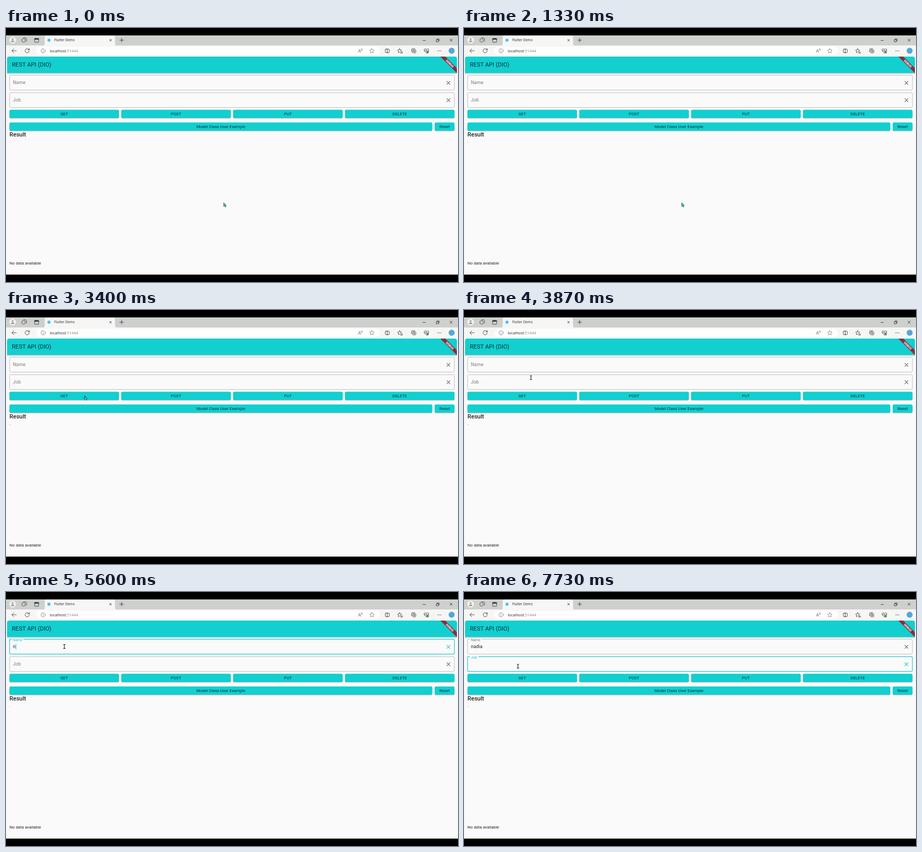
Write an HTML page that moves like this. It is 852 px wide and 480 px high and loops after 8 s.

```html
<!DOCTYPE html>
<html lang="en">
<head>
<meta charset="utf-8">
<title>REST API demo</title>
<style>
  html, body { margin: 0; width: 100%; height: 100%; overflow: hidden; background: #000; }
  svg { display: block; width: 100vw; height: 100vh; }
  text { font-family: Roboto, sans-serif; font-size: 7.77px; fill: #242424; }
  .chrome { font-family: "Open Sans", sans-serif; }
  .mid { text-anchor: middle; fill: #06333a; }
  .icon { fill: none; stroke: #3a3a3a; stroke-width: .85; stroke-linecap: round; stroke-linejoin: round; }
  .thin { fill: none; stroke: #262626; stroke-width: .8; }
</style>
</head>
<body>
<svg id="stage" viewBox="0 0 852 480">
  <defs>
    <clipPath id="bar"><path d="M2 85V58q0-4 4-4H846q4 0 4 4V85Z"/></clipPath>
    <linearGradient id="fade" x2="0" y2="1">
      <stop stop-color="#444" stop-opacity=".36"/>
      <stop offset="1" stop-color="#444" stop-opacity="0"/>
    </linearGradient>
  </defs>
  <rect width="852" height="480"/>

  <!-- browser tabs -->
  <rect y="14" width="852" height="20" fill="#cdd0cd"/>
  <rect y="33" width="852" height="433" fill="#f6f7f5"/>
  <path d="M69 33.5q4 0 4-4V18q0-3.500 3.500-3.500H202q3.500 0 3.500 3.500V29.500q0 4 4 4Z" fill="#f6f7f5"/>
  <circle cx="12.500" cy="23" r="6.300" fill="#f2f2ee"/>
  <circle cx="12.500" cy="21" r="1.700" fill="#9a9a94"/>
  <path d="M9.300 26.500q0-3 3.200-3t3.200 3Z" fill="#9a9a94"/>
  <g class="icon">
    <path d="M30.300 21.300l3-1.500 3 1.500v4l-3 1.700-3-1.700ZM33 18.500h4.500l1.200 1.200V25" stroke-width=".8"/>
    <rect x="54" y="19.500" width="7.500" height="7.500" rx="1"/>
    <path d="M54 21h7.500" stroke-width="2"/>
  </g>
  <circle cx="81" cy="23" r="3" fill="#55bff0"/>
  <text class="chrome" x="91" y="25.300" style="font-size:6.270px">Flutter Demo</text>
  <path class="thin" d="M195 21l4.200 4.200m0-4.200l-4.200 4.200M214 23h8m-4-4v8M785.500 23.500h5.500M836.500 20.500l5 5m0-5l-5 5"/>
  <path class="thin" d="M811 22h4v4h-4ZM812.500 22v-1.300h3.800v3.800H815"/>

  <!-- browser toolbar -->
  <rect x="57" y="35.500" width="648" height="15.500" rx="7.700" fill="#fefefe"/>
  <g class="icon">
    <path d="M19.500 43h-8.500m3.700-3.700L11 43l3.700 3.700"/>
    <path d="M43.700 41.200a4 4 0 1 0 .3 2.500M44 38.800v2.700h-2.700"/>
    <g stroke="#7c7c7c" stroke-width=".8">
      <circle cx="70" cy="43.200" r="4"/><path d="M70 42.700v2.500M70 41v.1"/>
      <path d="M664 46.200l2.300-6.200 2.400 6.200m-4-2h3.200M669.300 39.500q1.100 1 .4 2.700M670.800 38.700q1.600 1.800.6 4"/>
      <path d="M689.500 38.800l1.300 2.800 3 .4-2.200 2.100.6 3-2.700-1.500-2.700 1.500.6-3-2.200-2.100 3-.4Z"/>
    </g>
    <rect x="715" y="40" width="7.500" height="6.500" rx="1"/><path d="M718.700 39v8.500"/>
    <path d="M742 39l1.200 2.500 2.700.4-2 1.900.3 1.200M742 39l-1.200 2.500-2.700.4 2 1.900-.5 2.800 2.400-1.300M744.500 45.500h3M743.500 47.300h4"/>
    <rect x="766.500" y="41" width="6" height="6" rx="1.200"/>
    <path d="M769.500 42.500v3m-1.500-1.500h3M764.500 45v-4q0-2 2-2h4"/>
    <path d="M792.500 47.300l-4-4q-1.400-2.100.3-3.500 2-1.200 3.700.8 1.700-2 3.700-.8 1.700 1.400.3 3.500ZM788.500 43h2l1.200-1.500 1.500 3 1-1.500h2"/>
  </g>
  <circle cx="794.700" cy="45.700" r="2.300" fill="#4e8d5a"/>
  <g fill="#3a3a3a"><circle cx="814" cy="43.300" r=".75"/><circle cx="816.800" cy="43.300" r=".75"/><circle cx="819.600" cy="43.300" r=".75"/></g>
  <circle cx="840" cy="43" r="5.700" fill="#55a6dc"/>
  <text class="chrome" x="82.500" y="45.800" style="font-size:7.300px">localhost<tspan fill="#858585">:51444</tspan></text>

  <!-- page -->
  <path d="M2 58q0-4 4-4H846q4 0 4 4V461q0 4-4 4H6q-4 0-4-4Z" fill="#fafafa"/>
  <rect x="2" y="84.500" width="848" height="3.500" fill="url(#fade)"/>
  <g clip-path="url(#bar)">
    <rect x="2" y="54" width="848" height="31" fill="#12cfd0"/>
    <g transform="translate(850 54) rotate(45)">
      <rect x="-22.200" y="15.500" width="44.400" height="6.700" fill="#85303f"/>
      <text y="20.900" text-anchor="middle" style="font-size:5.660px;font-weight:900;fill:#fff">DEBUG</text>
    </g>
  </g>
  <text x="11" y="73" style="font-size:11.100px;fill:#06333a">REST API (DIO)</text>
  <g id="buttons"></g>
  <g id="fields"></g>
  <text x="6.500" y="205" style="font-size:11.100px;font-weight:500">Result</text>
  <text x="6.500" y="217">.</text>
  <text x="6.500" y="446.700">No data available</text>

  <g id="pointer">
    <path id="arrow" d="M0 0V7.300l1.700-1.500 1.200 2.700 1.200-.5-1.200-2.600h2.200Z" fill="#2ecdb4" stroke="#24484a" stroke-width=".7"/>
    <path id="hand" d="M-.6.300q.7-.8 1.300 0V3l2.600.6q.8.300.6 1.200L3.400 7.500H.3L-2 4.700q-.1-1 .8-.6l.6.500Z" fill="#35d6cc" stroke="#0a3d3f" stroke-width=".8"/>
    <path id="beam" d="M-2-3.600H-.6L0-3.200.6-3.600H2M0-3.200V3.200M-2 3.600H-.6L0 3.200.6 3.600H2" fill="none" stroke="#202020" stroke-width="1.100"/>
  </g>
</svg>
<script>
const LOOP = 8000, BLINK = 500, FLOAT = 200;
const TEAL = "#12cfd0", ACCENT = "#24c6d2";
const $ = id => document.getElementById(id);
const clamp = v => Math.max(0, Math.min(1, v));
const smooth = v => v * v * (3 - 2 * v);
const mix = (a, b, k) => a + (b - a) * k;

function add(parent, tag, attrs, label = "") {
  const el = document.createElementNS("http://www.w3.org/2000/svg", tag);
  for (const key in attrs) el.setAttribute(key, attrs[key]);
  el.textContent = label;
  parent.append(el);
  return el;
}

const buttons = [
  ["GET", 6.5, 154.5, 206.5], ["POST", 217.3, 154.5, 206.5],
  ["PUT", 428.1, 154.5, 206.5], ["DELETE", 638.9, 154.5, 206.5],
  ["Model Class User Example", 6.5, 178.5, 797], ["Reset", 808, 178.5, 37.4]
];
for (const [label, x, y, width] of buttons) {
  const box = { x, width, height: 15.6, rx: 2.2 };
  add($("buttons"), "rect", { ...box, y: y + 1.2, fill: "#555", opacity: .36 });
  add($("buttons"), "rect", { ...box, y, fill: TEAL });
  add($("buttons"), "text", { x: x + width / 2, y: y + 10.4, class: "mid" }, label);
}

function makeField(name, y, labelWidth, on, off) {
  const g = $("fields");
  return {
    y, labelWidth, on, off,
    border: add(g, "path", { fill: "none" }),
    label: add(g, "text", { style: "font-size:8.88px" }, name),
    value: add(g, "text", { x: 13, y: y + 17.1, style: "font-size:8.88px" }),
    caret: add(g, "rect", { y: y + 9, width: 1.1, height: 10.2, fill: ACCENT }),
    cross: add(g, "path", {
      d: `M830.7 ${y + 11}l6.600 6.600m0-6.600l-6.600 6.600`, fill: "none", "stroke-width": 1.1
    })
  };
}
const nameField = makeField("Name", 89.3, 17.8, 4270, 7200);
const jobField = makeField("Job", 122.2, 12.2, 7200, LOOP);

const word = "nadia", keyTimes = [5530, 5670, 5900, 6070, 6270];

// start, end, and the place reached, with rests between
const home = [410.3, 330];
const moves = [
  [2500, 3350, 148.7, 162.2], [3500, 4170, 110, 103],
  [6570, 6800, 107.7, 109.7], [6980, 7180, 101.7, 140.3]
];

function pointerAt(t) {
  let [x, y] = home;
  for (const [start, end, nx, ny] of moves) {
    const k = smooth(clamp((t - start) / (end - start)));
    x = mix(x, nx, k);
    y = mix(y, ny, k);
  }
  return [x, y];
}

function pointerKind(x, y) {
  if ([nameField, jobField].some(f => y > f.y && y < f.y + 28)) return "beam";
  const hit = buttons.some(b => x > b[1] && x < b[1] + b[3] && y > b[2] && y < b[2] + 15.6);
  return hit ? "hand" : "arrow";
}

function drawField(f, t, typed, lastKey) {
  const focused = t >= f.on && t < f.off;
  const k = smooth(clamp((t - f.on) / FLOAT));
  const { y } = f, bottom = y + 28;
  const gapStart = k ? 11 : 12, gapEnd = gapStart + (f.labelWidth + 4) * k;
  f.border.setAttribute("d",
    `M${gapEnd} ${y}H843q2.2 0 2.200 2.200V${bottom - 2.2}q0 2.200-2.200 2.200H9` +
    `q-2.200 0-2.200-2.200V${y + 2.2}q0-2.200 2.200-2.200H${gapStart}`);
  f.border.setAttribute("stroke", focused ? ACCENT : "#a6a6a6");
  f.border.setAttribute("stroke-width", focused ? 1.2 : .7);
  f.label.setAttribute("transform",
    `translate(13 ${mix(y + 16.7, y + 3.6, k)}) scale(${mix(1, .75, k)})`);
  f.label.style.fill = focused ? ACCENT : "#7c7c7c";
  f.cross.setAttribute("stroke", focused ? ACCENT : "#6c6c6c");
  f.value.textContent = typed;
  const blinkOn = Math.floor((t - lastKey) / BLINK) % 2 === 0;
  f.caret.style.display = focused && blinkOn ? "" : "none";
  f.caret.setAttribute("x", 13.3 + (typed ? f.value.getComputedTextLength() : 0));
}

function draw(t) {
  const pressed = keyTimes.filter(k => k <= t);
  drawField(nameField, t, word.slice(0, pressed.length), pressed.at(-1) ?? nameField.on);
  drawField(jobField, t, "", jobField.on);
  const [x, y] = pointerAt(t), kind = pointerKind(x, y);
  $("pointer").setAttribute("transform", `translate(${x} ${y})`);
  for (const id of ["arrow", "hand", "beam"]) $(id).style.display = id === kind ? "" : "none";
}

const began = performance.now();
function tick() {
  draw((performance.now() - began) % LOOP);
  requestAnimationFrame(tick);
}
tick();
</script>
</body>
</html>
```
